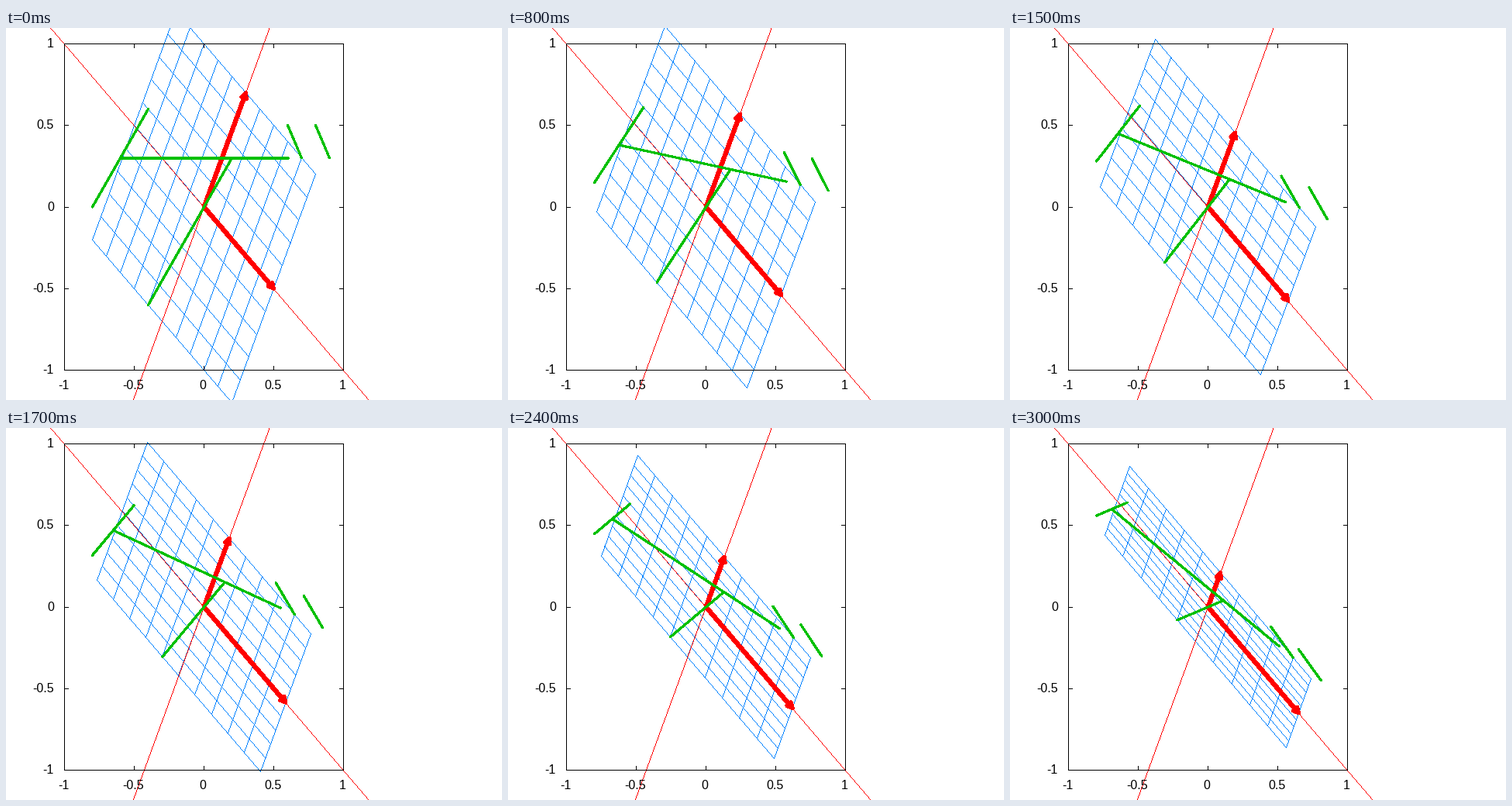
Recreate the animation shown at these times as a matplotlib script. Size 640 by 480 pixels, loop 3.1 s.

```python
import numpy as np
import matplotlib.pyplot as plt
from matplotlib.animation import FuncAnimation
from matplotlib.collections import LineCollection
from matplotlib.patches import Polygon

W, H, DPI = 640, 480, 100
FRAMES, INTERVAL = 31, 100
PX = 72 / DPI  # one pixel in points

RED, GREEN, BLUE, BLACK = (255, 0, 0), (0, 192, 0), (0, 128, 255), (0, 0, 0)

U, V = np.array([0.5, -0.5]), np.array([0.3, 0.7])
BASIS = np.column_stack([U, V])
GRID = np.linspace(-1, 1, 11)
SHAPES = np.array([
    [(-0.8, 0), (-0.4, 0.6)],
    [(-0.6, 0.3), (0.6, 0.3)],
    [(-0.4, -0.6), (0.2, 0.3)],
    [(0.6, 0.5), (0.7, 0.3)],
    [(0.8, 0.5), (0.9, 0.3)],
])
TICKS = [-1, -0.5, 0, 0.5, 1]
LEFT, RIGHT, TOP, BOTTOM = 75.5, 435.5, 20.5, 441.5

# grid lines in basis coordinates
CELLS = np.array([[(s, -1), (s, 1)] for s in GRID]
                 + [[(-1, s), (1, s)] for s in GRID])


def to_px(points):
    """Map plot coordinates to stage pixels."""
    return np.array([255.5, 231]) + np.asarray(points) * [180, -210.5]


def axis_marks():
    marks = [[(LEFT, TOP), (RIGHT, TOP)], [(LEFT, BOTTOM), (RIGHT, BOTTOM)],
             [(LEFT, TOP), (LEFT, BOTTOM)], [(RIGHT, TOP), (RIGHT, BOTTOM)]]
    for t in TICKS:
        x, y = to_px((t, t))
        marks += [[(x, TOP), (x, TOP + 5)], [(x, BOTTOM), (x, BOTTOM - 5)],
                  [(LEFT, y), (LEFT + 5, y)], [(RIGHT, y), (RIGHT - 5, y)]]
    return marks


AXES = [to_px([-4 * d, 4 * d]) for d in (U, V)]
MARKS = axis_marks()

fig = plt.figure(figsize=(W / DPI, H / DPI), dpi=DPI, facecolor="white")
ax = fig.add_axes([0, 0, 1, 1])
ax.axis("off")
canvas = ax.imshow(np.full((H, W, 3), 255, np.uint8), extent=(0, W, H, 0),
                   interpolation="nearest", aspect="auto", zorder=1)
ax.set_xlim(0, W)
ax.set_ylim(H, 0)


def hairlines(image, segments, color):
    """Draw hard-edged lines one pixel wide."""
    for start, end in np.floor(segments):
        steps = int(max(abs(end - start)))
        path = start + np.linspace(0, 1, steps + 1)[:, None] * (end - start)
        x, y = np.floor(path + 0.5).astype(int).T
        inside = (x >= 0) & (x < W) & (y >= 0) & (y < H)
        image[y[inside], x[inside]] = color


# Hard-edged strokes fill every pixel they touch, so widths are set about
# one pixel below the width seen on the stage.
def add_strokes(color, width, cap, z):
    lines = LineCollection([], colors=[np.divide(color, 255)],
                           linewidths=width * PX, antialiaseds=False,
                           capstyle=cap, zorder=z)
    ax.add_collection(lines, autolim=False)
    return lines


def add_head():
    return ax.add_patch(Polygon(
        np.zeros((3, 2)), closed=True, color=np.divide(RED, 255),
        linewidth=4 * PX, joinstyle="round", antialiased=False, zorder=3))


def head_points(tip, d, length=7, half=3.5):
    side = np.array([-d[1], d[0]]) * half
    base = tip - d * length
    return [tip, base + side, base - side]


shafts = add_strokes(RED, 5, "butt", 3)
heads = [add_head(), add_head()]
shapes = add_strokes(GREEN, 2.1, "round", 4)

font = dict(family="Liberation Sans", size=16 * PX, color="black",
            va="baseline", zorder=6)
for t in TICKS:
    x, y = to_px((t, t))
    ax.text(x - 1.5, 466, f"{t:g}", ha="center", **font)
    ax.text(62, y + 4.5, f"{t:g}", ha="right", **font)


def update(i):
    t = i / (FRAMES - 1)
    scaled = BASIS * [1 + 0.3 * t, 1 - 0.7 * t]
    transform = scaled @ np.linalg.inv(BASIS)

    image = np.full((H, W, 3), 255, np.uint8)
    hairlines(image, to_px(CELLS @ scaled.T), BLUE)
    hairlines(image, AXES, RED)
    hairlines(image, MARKS, BLACK)
    canvas.set_data(image)

    shapes.set_segments(to_px(SHAPES @ transform.T))

    origin = to_px((0, 0))
    segments = []
    for head, tip in zip(heads, to_px(scaled.T)):
        d = (tip - origin) / np.hypot(*(tip - origin))
        segments.append([origin, tip - 4 * d])
        head.set_xy(head_points(tip, d))
    shafts.set_segments(segments)
    return [canvas, shafts, *heads, shapes]


anim = FuncAnimation(fig, update, frames=FRAMES, interval=INTERVAL,
                     repeat=True, repeat_delay=0, blit=False)
plt.show()
```
